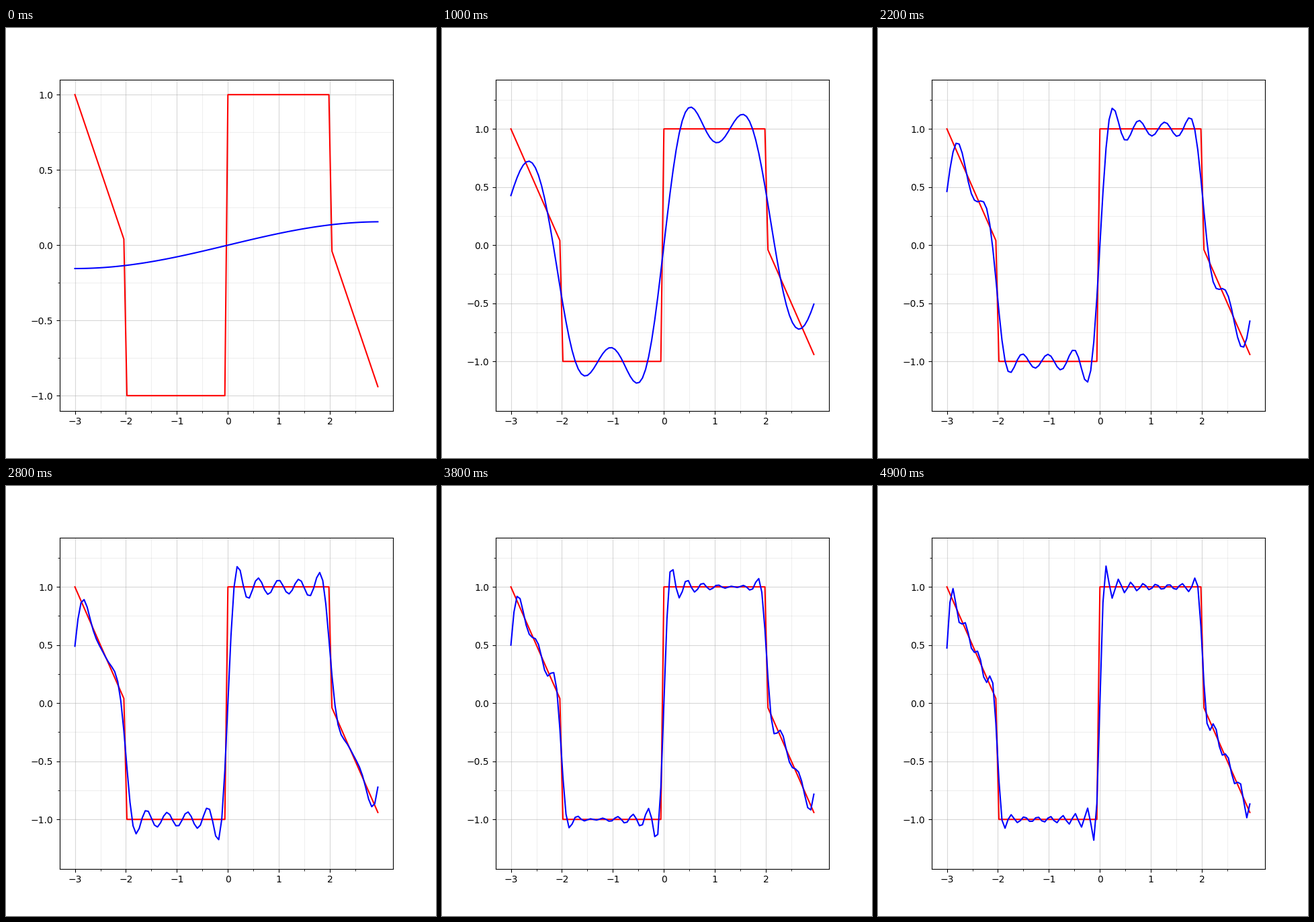
A matplotlib script for the animation above (5000 ms loop, 640 px wide and 640 px high).

```python
import numpy as np
import matplotlib.pyplot as plt
from matplotlib.animation import FuncAnimation

HALF_PERIOD = 6
TERMS = 50
MARGIN = 0.05

x = -3 + 0.06 * np.arange(100)
x[50] = 0.0
size = np.abs(x)
signal = np.where(x >= 0, 1, -1) * np.where(size < 2, 1, 2 - size)

# Sine coefficients of the odd signal, taken as zero beyond |x| = 3.
a = np.arange(1, TERMS + 1) * np.pi / HALF_PERIOD
b = ((1 - np.cos(2 * a) + np.cos(3 * a)) / a
     - (np.sin(3 * a) - np.sin(2 * a)) / a**2) * 2 / HALF_PERIOD

partial_sums = np.cumsum(b[:, None] * np.sin(np.outer(a, x)), axis=0)

# The y range only ever grows to fit every sum drawn so far.
high = np.maximum.accumulate(np.maximum(partial_sums.max(axis=1), signal.max()))
low = np.minimum.accumulate(np.minimum(partial_sums.min(axis=1), signal.min()))
pad = MARGIN * (high - low)

fig, ax = plt.subplots(figsize=(6.4, 6.4), dpi=100)
ax.plot(x, signal, color="red")
(series,) = ax.plot(x, partial_sums[0], color="blue")

ax.set_xticks(np.arange(-3, 3, 1))
ax.set_xticks(np.arange(-3, 3, 0.5), minor=True)
ax.set_yticks(np.arange(-1, 1.5, 0.5))
ax.set_yticks(np.arange(-1, 1.5, 0.25), minor=True)
ax.grid(which="major", alpha=0.5)
ax.grid(which="minor", alpha=0.2)

x_pad = MARGIN * (x[-1] - x[0])
ax.set_xlim(x[0] - x_pad, x[-1] + x_pad)


def update(frame):
    series.set_ydata(partial_sums[frame])
    ax.set_ylim(low[frame] - pad[frame], high[frame] + pad[frame])
    return (series,)


update(0)
animation = FuncAnimation(fig, update, frames=TERMS, interval=100,
                          repeat=True, repeat_delay=0, blit=False)
plt.show()
```
